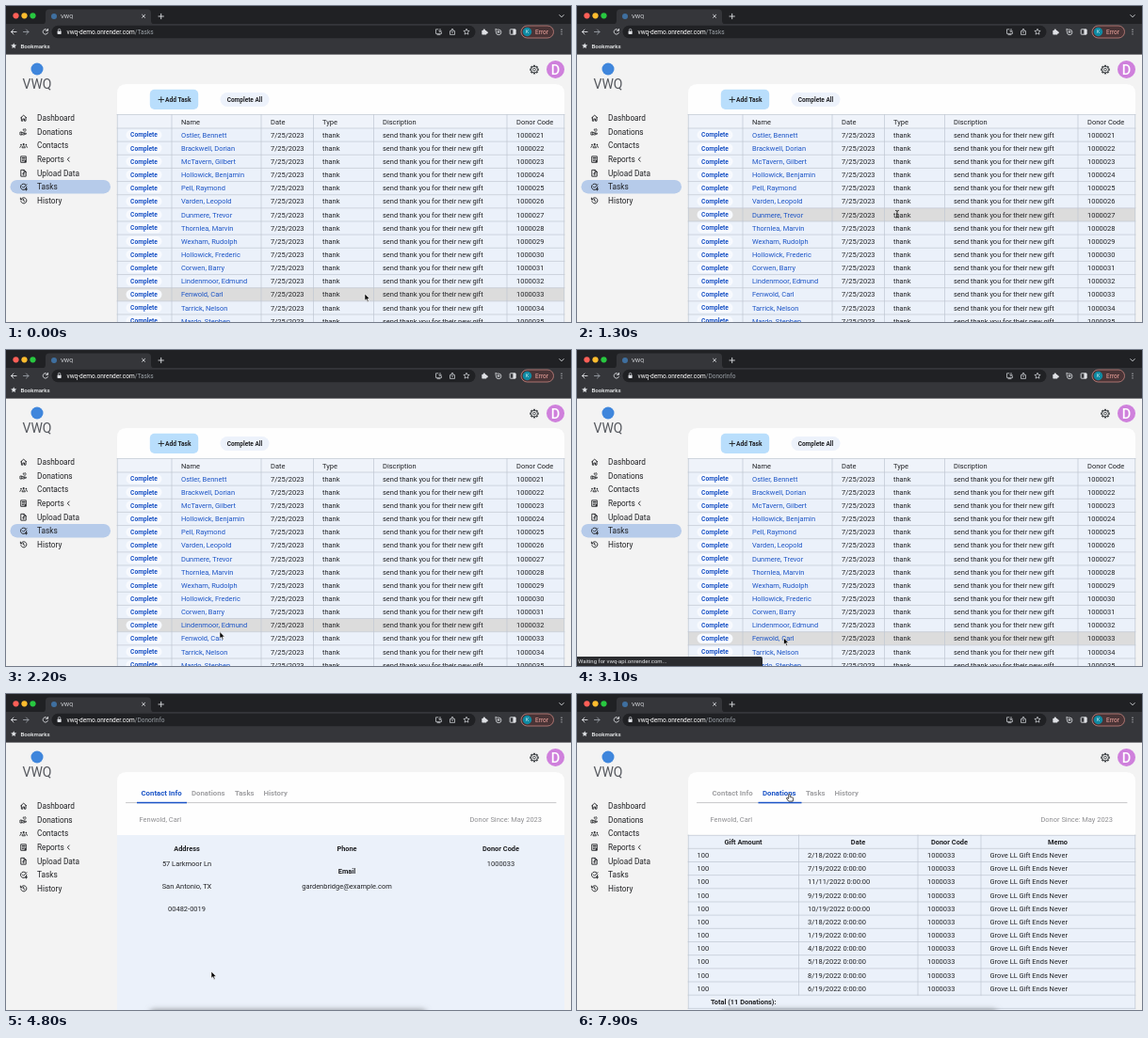
These frames come from a looping animation (600 by 336 pixels, 8000 ms). An HTML page:

```html
<!DOCTYPE html>
<html lang="en">
<head>
<meta charset="utf-8">
<title>Donor tasks</title>
<style>
  html, body { margin: 0; width: 100%; height: 100%; overflow: hidden; background: #f3f3f3; }
  svg { display: block; width: 100vw; height: 100vh; }
  text { font-family: Roboto, Arial, sans-serif; white-space: pre; }
  .line { fill: none; stroke-linecap: round; stroke-linejoin: round; }
</style>
</head>
<body>
<svg id="stage" viewBox="0 0 600 336" xmlns="http://www.w3.org/2000/svg"></svg>
<script>
const LOOP = 8000, STEP = 100;
const OPEN_DONOR = 2900, SHOW_DONOR = 3300, LOAD_DONOR = 3500, HIDE_STATUS = 3700;
const OPEN_GIFTS = 6900, SHOW_GIFTS = 7000;
const BLUE = '#1a53c6', INK = '#202124', GRID = '#bfc6d1', PALE = '#ebf1fa', PAGE = '#f3f3f3';
const ROW = 14.14, ROWS_TOP = 130;

// Text is placed by the vertical middle of its capitals.
const text = (x, y, s, { size = 7.48, fill = INK, weight = 400, anchor = 'start', id = '' } = {}) =>
  `<text ${id && `id="${id}"`} x="${x}" y="${(y + size * .355).toFixed(2)}" font-size="${size}" fill="${fill}" font-weight="${weight}" text-anchor="${anchor}">${s}</text>`;
const rect = (x, y, w, h, fill, r = 0, extra = '') =>
  `<rect x="${x}" y="${y}" width="${w}" height="${h}" rx="${r}" fill="${fill}" ${extra}/>`;
const circle = (x, y, r, fill, extra = '') => `<circle cx="${x}" cy="${y}" r="${r}" fill="${fill}" ${extra}/>`;
const line = (d, color = INK, w = .9) => `<path class="line" d="${d}" stroke="${color}" stroke-width="${w}"/>`;
const at = (x, y, body) => `<g transform="translate(${x} ${y})">${body}</g>`;
const group = (id, body) => `<g id="${id}">${body}</g>`;
const centered = { anchor: 'middle' };
const heading = { anchor: 'middle', weight: 700, size: 7.4 };

const star = (r, fill, stroke) => {
  const points = Array.from({ length: 10 }, (_, i) => {
    const a = i * Math.PI / 5 - Math.PI / 2, d = i % 2 ? r * .45 : r;
    return `${(d * Math.cos(a)).toFixed(2)},${(d * Math.sin(a)).toFixed(2)}`;
  });
  return `<polygon points="${points.join(' ')}" fill="${fill}" stroke="${stroke}" stroke-width=".7"/>`;
};

function browserChrome() {
  const light = '#dfe1e5', dim = '#9aa0a6';
  const lights = ['#ff5f57', '#febc2e', '#28c840'].map((c, i) => circle(10.5 + i * 9, 10.3, 3.1, c)).join('');
  return rect(0, 0, 600, 20, '#202124') +
    '<path d="M38 19.5q4 0 4-4v-8q0-4 4-4h104q4 0 4 4v8q0 4 4 4z" fill="#35363a"/>' +
    rect(0, 19, 600, 32.6, '#35363a') + lights +
    circle(51, 11, 3, '#3f6f9f') + text(58, 11, 'VWQ', { size: 6, fill: light }) +
    line('M144.6 9.3l3 3m0-3l-3 3M162 11h5.4m-2.7-2.7v5.4', light, .9) +
    line('M587.8 9.6l2.2 2.2 2.2-2.2', light) +
    line('M11 27.5H5.5m2.5-2.5l-2.5 2.5 2.5 2.5', light) +
    line('M18.5 27.5H24m-2.5-2.5l2.5 2.5-2.5 2.5', dim) +
    line('M44.2 25.9a2.7 2.7 0 1 0 .2 2.6M44.5 24.4v1.9h-1.9', light) +
    rect(48.5, 20.8, 450, 13.4, '#202124', 6.7) +
    rect(54.6, 26.7, 4, 3.2, light, .5) + line('M55.4 26.6v-1a1.2 1.2 0 0 1 2.4 0v1', light, .7) +
    `<text x="64.5" y="29.8" font-size="6.55" fill="#fff">vwq-demo.onrender.com<tspan id="path" fill="${dim}"></tspan></text>` +
    line('M459 24.8h-2.5v4.6h6v-1.5M461 24.5v3m-1.2-1.2l1.2 1.2 1.2-1.2M458 30.6h3', light, .7) +
    line('M472.5 26.6h-1v3.8h5v-3.8h-1M474 28.6v-4.2m-1.4 1.3l1.4-1.3 1.4 1.3', light, .7) +
    at(489, 27.5, star(3.3, 'none', light)) +
    rect(505.3, 26, 5, 4.4, light, .6) + circle(507.8, 25.7, 1.2, light) + circle(510.5, 28.2, 1.2, light) +
    line('M520.2 24.6q1.4.9 3 .5a2.8 2.8 0 1 1-2.9 2.8zM521.8 27.6h2.4m-1.2-1.2v2.4', light, .8) +
    rect(535.2, 24.8, 6, 5.4, 'none', .6, `stroke="${light}" stroke-width=".9"`) + rect(538.4, 24.8, 2.8, 5.4, light) +
    rect(547, 21, 34.5, 13, '#4a3436', 6.5, 'stroke="#d98e88" stroke-width=".7"') +
    circle(553.5, 27.5, 4.7, '#0f8aa3') + text(553.5, 27.5, 'K', { size: 5, fill: '#d9f2f6', ...centered }) +
    text(562, 27.5, 'Error', { size: 6.5, fill: '#f2a8a1' }) +
    [25.2, 27.5, 29.8].map(y => circle(590, y, .6, light)).join('') +
    at(8.2, 42.5, star(3.2, light, 'none')) +
    text(15.5, 42.5, 'Bookmarks', { size: 6.1, fill: '#f1f3f4', weight: 500 });
}

function sidebar() {
  const icons = [
    line('M-3-.4L0-3 3-.4M-2.3-.8v3.8h1.5V.8H.8v2.2h1.5V-.8'),
    line('M-3.4.2h1.5v3h-1.5zM-1.9.6h1.7l1.7.8-.6.5h-1.3M-1.9 2.7l2 .5 3-1.2q-.2-.9-1.4-.5l-.8.3M1-.5L-.4-1.9q-.3-1.2.8-1.2l.6.5.6-.5q1.1 0 .8 1.2z', INK, .8),
    circle(0, -1.5, 1, INK) + circle(-2.7, -.8, .8, INK) + circle(2.7, -.8, .8, INK) +
      line('M-1.7 1.9q0-1.5 1.7-1.5t1.7 1.5zM-4 1.9q0-1.1 1.2-1.3M4 1.9Q4 .8 2.8.6', INK, .8),
    line('M-2.6-3.2h5.2v6.4h-5.2zM-1.4-1.6h2.8M-1.4 0h2.8M-1.4 1.6h1.2') + circle(1.6, 2, 1, INK),
    line('M-2.5-3.4h3l2 2v4.8h-5zM.4-3.3v2h2M0 2.1v-2.6m-1.1 1.1L0-.5 1.1.6'),
    line('M2.3-2.3a3.2 3.2 0 1 0 .9 2.1M-1.4-.4L-.1.9 3.2-2.6M1.5 2.5h2.4m-1.2-1.2v2.4'),
    line('M-2.8-1.3a3.1 3.1 0 1 1-.1 2M-3.3-2.9v1.8h1.8M0-1.6v1.8l1.4.8'),
  ];
  const labels = ['Dashboard', 'Donations', 'Contacts', 'Reports', 'Upload Data', 'Tasks', 'History'];
  return circle(33, 67, 6.5, '#3f86dc') +
    text(33, 82.8, 'VWQ', { size: 14, fill: '#55585e', ...centered }) +
    group('navMark', rect(4.5, 184.9, 106.5, 14.6, '#b6cbea', 7.3)) +
    labels.map((s, i) => {
      const y = 119.2 + i * 14.63;
      return at(18.7, y, icons[i]) + text(33, y, s, { size: 8.27 });
    }).join('') +
    line('M67.2 161l-1.9 2.1 1.9 2.1');
}

function accountIcons() {
  const teeth = Array.from({ length: 8 }, (_, i) => `<rect x="-1.1" y="-4.8" width="2.2" height="2.2" fill="#3c4043" transform="rotate(${i * 45})"/>`).join('');
  return at(561, 67.6, teeth + circle(0, 0, 3.4, PAGE, 'stroke="#3c4043" stroke-width=".9"') +
    circle(0, 0, 1.4, 'none', 'stroke="#3c4043" stroke-width=".9"')) +
    circle(583.5, 67.4, 9.5, '#cf80dc') + text(583.5, 67.5, 'D', { size: 14.5, fill: '#fff', weight: 500, ...centered });
}

const rules = (xs, y1, y2) => xs.map(x => line(`M${x} ${y1}V${y2}`, GRID, .7)).join('');
const people = ['Ostler, Bennett', 'Brackwell, Dorian', 'McTavern, Gilbert', 'Hollowick, Benjamin', 'Pell, Raymond',
  'Varden, Leopold', 'Dunmere, Trevor', 'Thornlea, Marvin', 'Wexham, Rudolph', 'Hollowick, Frederic', 'Corwen, Barry',
  'Lindenmoor, Edmund', 'Fenwold, Carl', 'Tarrick, Nelson', 'Mardo, Stephen'];
const donor = people[12];

function taskPage() {
  const columns = [[186, 'Name'], [281, 'Date'], [336, 'Type'], [400, 'Discription'], [542, 'Donor Code']];
  const rows = people.map((name, i) => {
    const top = ROWS_TOP + i * ROW, y = top + ROW / 2;
    const cells = [name, '7/25/2023', 'thank', 'send thank you for their new gift', 1000021 + i];
    return rect(118, top, 475, ROW, PALE, 0, `class="row"`) +
      rect(127.5, y - 5.2, 38, 10.4, '#f8fafe', 5.2) +
      text(146.5, y, 'Complete', { size: 6.65, fill: BLUE, weight: 700, ...centered }) +
      cells.map((s, c) => text(columns[c][0], y, s, { fill: c ? INK : BLUE })).join('') +
      line(`M118 ${top}H593`, GRID, .7);
  }).join('');
  return rect(152.8, 88.8, 51.4, 21.2, '#b9defc', 5) +
    line('M162 99.5h5.6m-2.8-2.8v5.6') + text(169, 99.5, 'Add Task', { size: 6.65, weight: 700 }) +
    rect(227.5, 92, 52, 15, '#edf2fb', 7.5) + text(253.5, 99.5, 'Complete All', { size: 6.5, weight: 700, ...centered }) +
    rect(118, 115.5, 475, 14.5, '#eff3fa') + line('M118 115.5H593', GRID, .7) +
    columns.map(([x, s]) => text(x, 122.9, s)).join('') +
    rows + rules([118.3, 176, 271, 326.5, 390.5, 532, 592.7], 115.5, 336);
}

function contactPanel() {
  const data = text(192, 180.7, '57 Larkmoor Ln', centered) + text(192, 204.6, 'San Antonio, TX', centered) +
    text(192, 228.6, '00482-0019', centered) + text(362, 204.6, 'gardenbridge@example.com', centered) +
    text(525.5, 180.7, '1000033', centered);
  return text(192, 164, 'Address', heading) + text(362, 164, 'Phone', heading) +
    text(362, 188, 'Email', heading) + text(525.5, 164, 'Donor Code', heading) + group('donorData', data);
}

function giftPanel() {
  const dates = ['2/18', '7/19', '11/11', '9/19', '10/19', '3/18', '1/19', '4/18', '5/18', '8/19', '6/19'];
  const top = 164.3, pitch = 14.17;
  const rows = dates.map((d, i) => {
    const y = top + pitch * (i + .5);
    return text(127.5, y, '100') + text(245, y, d + '/2022 0:00:00') + text(372, y, '1000033') +
      text(438.5, y, 'Grove LL Gift Ends Never');
  }).join('');
  const lines = Array.from({ length: 13 }, (_, i) => line(`M118 ${top + pitch * i}H593`, GRID, .7)).join('');
  return text(176.5, 157.3, 'Gift Amount', heading) + text(298.5, 157.3, 'Date', heading) +
    text(395.5, 157.3, 'Donor Code', heading) + text(510.5, 157.3, 'Memo', heading) +
    line('M118 150.3H593', GRID, .7) + lines + rows + rules([235.5, 362, 429], 150, 320.2) +
    rules([118.3, 592.7], 150, 334.3) +
    text(142, 327.2, 'Total (11 Donations):', { size: 7.4, weight: 700 });
}

function donorPage() {
  const tab = (x, s, id) => text(x, 105.3, s, { size: 7.8, weight: 700, fill: '#a0a0a3', id });
  return tab(143.5, 'Contact Info', 'contactTab') + tab(197, 'Donations', 'giftTab') + tab(243, 'Tasks') + tab(273.5, 'History') +
    line('M127.5 115.6H584', '#b9b9bc', .8) +
    rect(139, 114.8, 53, 1.5, BLUE, 0, 'id="tabBar"') +
    text(141.5, 132.9, donor, { fill: '#8d8d90' }) +
    text(569, 132.9, 'Donor Since: May 2023', { fill: '#8d8d90', anchor: 'end' }) +
    rect(118, 150, 475, 186, PALE) + group('contact', contactPanel()) + group('gifts', giftPanel()) +
    rect(153, 336, 293, 16, '#85888c', 4, 'filter="url(#soft)"');
}

function pointers() {
  return group('arrow', '<path d="M0 0V7.2L1.7 5.7 2.9 8.4 4.1 7.9 2.9 5.3H5.2z" fill="#000" stroke="#fff" stroke-width=".6"/>') +
    group('beam', line('M-1.5-3.6Q0-3.6 0-2.6 0-3.6 1.5-3.6M0-2.6V3.2M-1.5 4Q0 4 0 3 0 4 1.5 4', '#111', .8)) +
    group('hand', '<path d="M-.8.8q0-.9.8-.9t.8.9v2.1l2.5.6q1 .3.9 1.3l-.5 2.8H-.7L-2.9 4.9q-.4-.9.5-1l1.6.9z" fill="#fff" stroke="#111" stroke-width=".75"/>');
}

document.getElementById('stage').innerHTML =
  '<defs><filter id="soft" x="-10%" y="-100%" width="120%" height="300%"><feGaussianBlur stdDeviation="3"/></filter></defs>' +
  rect(0, 0, 600, 336, PAGE) + sidebar() + accountIcons() +
  '<path d="M118 336V93q0-10 10-10h455q10 0 10 10v243z" fill="#fefefe"/>' +
  group('tasks', taskPage()) + group('donor', donorPage()) + browserChrome() +
  group('status', rect(-3, 326, 200, 13, '#2b2c2f', 2) +
    text(1, 331.3, 'Waiting for vwq-api.onrender.com...', { size: 6, fill: '#e8eaed' })) +
  group('pointer', pointers());

const $ = id => document.getElementById(id);
const show = (id, on) => $(id).setAttribute('display', on ? 'inline' : 'none');
const rowBoxes = [...document.querySelectorAll('.row')];

// Pointer stops: time, x, y.
const route = [
  [0, 381, 306], [200, 380, 305], [700, 364, 262], [1300, 340, 221], [1800, 247, 282], [2300, 222, 304],
  [2800, 219.5, 306], [3300, 219.5, 306], [4000, 218, 295], [4800, 218, 295], [4900, 219, 251],
  [5200, 221, 165], [5500, 222, 118], [5800, 222.5, 106.8], [7600, 223, 106.8], [7900, 225.5, 106.5], [LOOP, 225.5, 106.5],
];
function pointerAt(t) {
  const i = route.findIndex(stop => stop[0] > t);
  const [t0, x0, y0] = route[i - 1], [t1, x1, y1] = route[i];
  const k = (t - t0) / (t1 - t0);
  return [x0 + (x1 - x0) * k, y0 + (y1 - y0) * k];
}

function render(t) {
  const [x, y] = pointerAt(t);
  const onTasks = t < SHOW_DONOR, gifts = t >= OPEN_GIFTS;
  const hover = Math.floor((y - ROWS_TOP) / ROW);
  const overText = onTasks && [[281, 316], [336, 355], [400, 507]].some(([a, b]) => x >= a && x <= b);
  const overTab = !onTasks && y > 96 && y < 115;

  show('tasks', onTasks);
  show('navMark', onTasks);
  show('donor', !onTasks);
  show('donorData', t >= LOAD_DONOR);
  show('contact', t < SHOW_GIFTS);
  show('gifts', t >= SHOW_GIFTS);
  show('status', t >= OPEN_DONOR && t < HIDE_STATUS);
  $('path').textContent = t < OPEN_DONOR ? '/Tasks' : '/DonorInfo';
  rowBoxes.forEach((r, i) => r.setAttribute('fill', i === hover ? '#dcdcdc' : PALE));

  $('contactTab').setAttribute('fill', gifts ? '#a0a0a3' : BLUE);
  $('giftTab').setAttribute('fill', gifts ? BLUE : overTab ? '#dedee0' : '#a0a0a3');
  const slide = Math.min(1, Math.max(0, (t - OPEN_GIFTS) / 300));
  const k = slide * slide * (3 - 2 * slide);
  $('tabBar').setAttribute('x', 139 + 53.5 * k);
  $('tabBar').setAttribute('width', 53 - 7 * k);

  show('hand', overTab);
  show('beam', overText);
  show('arrow', !overTab && !overText);
  $('pointer').setAttribute('transform', `translate(${x} ${y})`);
}

const start = performance.now();
function tick() {
  const t = (performance.now() - start) % LOOP;
  render(Math.floor(t / STEP) * STEP);
  requestAnimationFrame(tick);
}
tick();
</script>
</body>
</html>
```
